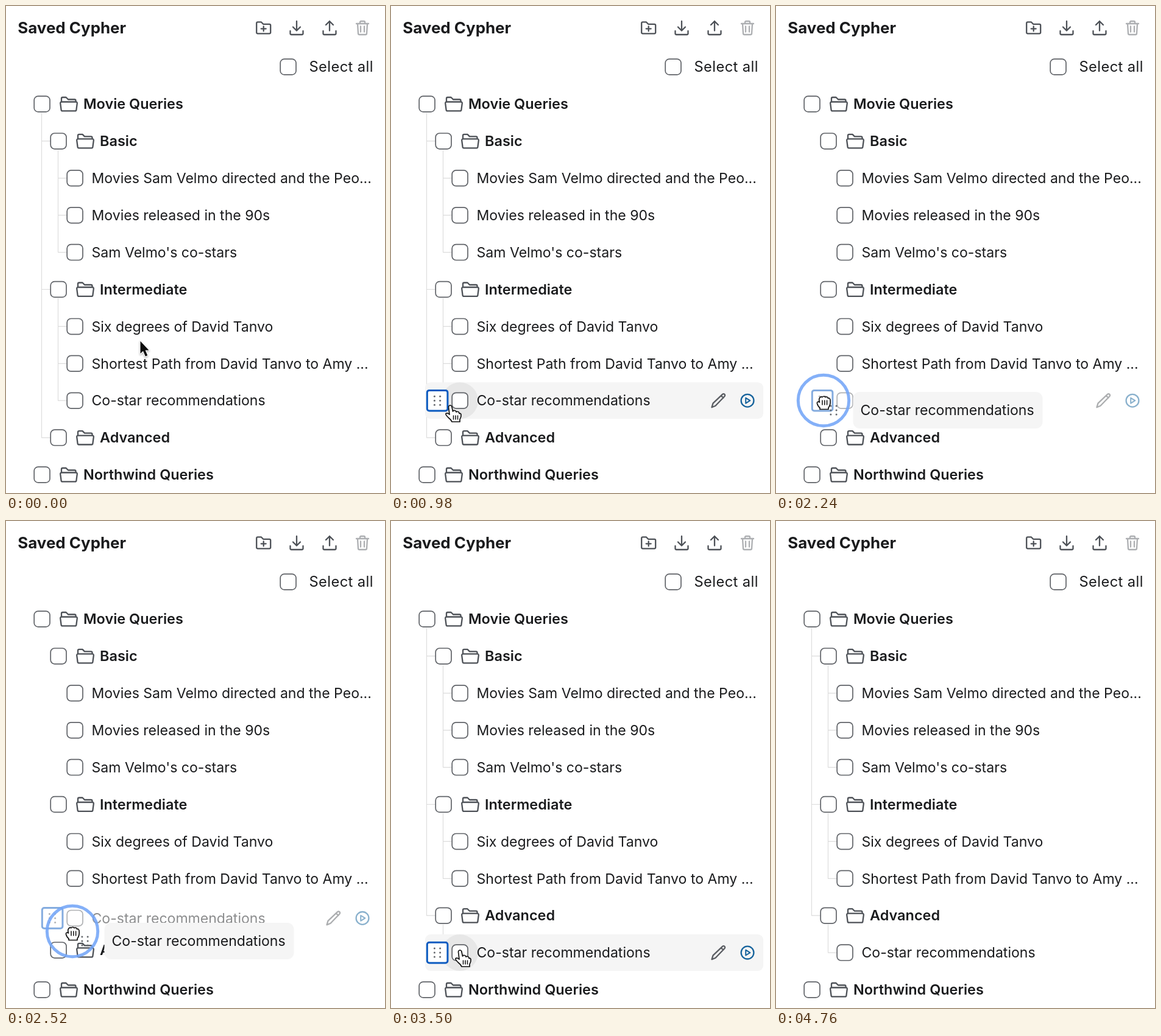
An HTML page with a canvas for the animation above (4.83 s loop, 622 by 800 pixels).

```html
<!DOCTYPE html>
<html lang="en">
<head>
<meta charset="utf-8">
<title>Saved Cypher</title>
<style>
  html, body { margin: 0; width: 100%; height: 100%; overflow: hidden; background: #fff; }
  canvas { display: block; width: 622px; height: 800px; }
</style>
</head>
<body>
<canvas id="stage" width="622" height="800"></canvas>
<script>
const ctx = document.getElementById('stage').getContext('2d');
const LOOP = 4830, STEP = 70, GAP = 60.9, TOP = 161;
const INK = '#1a1b1d', ICON = '#4d5157', LINE = '#dcdcdc', PALE = '#f5f5f5';
const DRAG_START = 2170, DROP = 3150;
const MOVED = 8, ADVANCED = 9;

const rows = [
  { level: 0, text: 'Movie Queries' },
  { level: 1, text: 'Basic' },
  { level: 2, text: 'Movies Sam Velmo directed and the Peo...', short: 'Movies Sam Velmo directed an...' },
  { level: 2, text: 'Movies released in the 90s' },
  { level: 2, text: "Sam Velmo's co-stars" },
  { level: 1, text: 'Intermediate' },
  { level: 2, text: 'Six degrees of David Tanvo' },
  { level: 2, text: 'Shortest Path from David Tanvo to Amy ...', short: 'Shortest Path from David Tanv...' },
  { level: 2, text: 'Co-star recommendations' },
  { level: 1, text: 'Advanced' },
  { level: 0, text: 'Northwind Queries' }
];

// Tracks hold [time, x, y]
const pointerTrack = [
  [420, 220, 550], [980, 97, 657], [1470, 77, 648], [2100, 77, 648],
  [2240, 78, 648], [2520, 109, 674], [3010, 112, 697], [3360, 113, 706],
  [3500, 113, 706], [3780, 155, 721], [3850, 155, 721], [4200, -30, 716]
];
const ghostTrack = [
  [2170, 138, 660], [2240, 139, 664], [2520, 174, 690], [3010, 178, 716], [3150, 179, 720]
];

const clamp = v => Math.max(0, Math.min(1, v));
const ease = v => { v = clamp(v); return v * v * (3 - 2 * v); };
const rowY = i => TOP + GAP * i;

function follow(track, t) {
  let i = 0;
  while (i < track.length - 2 && t >= track[i + 1][0]) i++;
  const [t0, x0, y0] = track[i], [t1, x1, y1] = track[i + 1];
  const k = ease((t - t0) / (t1 - t0));
  return { x: x0 + (x1 - x0) * k, y: y0 + (y1 - y0) * k };
}

function text(str, x, y, size = 23.05, weight = 400, spacing = 0) {
  ctx.font = `${weight} ${size}px Inter, "Open Sans", sans-serif`;
  ctx.letterSpacing = spacing + 'px';
  ctx.fillStyle = INK;
  ctx.fillText(str, x, y);
}

function box(x, y, w, h, r, fill, stroke, width) {
  ctx.beginPath();
  ctx.roundRect(x, y, w, h, r);
  if (fill) { ctx.fillStyle = fill; ctx.fill(); }
  if (stroke) { ctx.strokeStyle = stroke; ctx.lineWidth = width; ctx.stroke(); }
}

function disc(x, y, r, fill) {
  ctx.beginPath();
  ctx.arc(x, y, r, 0, 7);
  ctx.fillStyle = fill;
  ctx.fill();
}

function circle(x, y, r, color, width) {
  ctx.beginPath();
  ctx.arc(x, y, r, 0, 7);
  ctx.strokeStyle = color;
  ctx.lineWidth = width;
  ctx.stroke();
}

function draw(d, x, y, { stroke, width = 2.3, fill } = {}) {
  const path = new Path2D(d);
  ctx.save();
  ctx.translate(x, y);
  ctx.lineJoin = ctx.lineCap = 'round';
  if (fill) { ctx.fillStyle = fill; ctx.fill(path); }
  if (stroke) { ctx.strokeStyle = stroke; ctx.lineWidth = width; ctx.stroke(path); }
  ctx.restore();
}

const checkbox = (x, y) => box(x - 12.8, y - 12.9, 25.8, 25.8, 6.5, '#fff', '#606368', 1.7);

function folder(x, y) {
  draw('M-12 -3.5 V-9 a2 2 0 0 1 2 -2 H-4.5 l3.5 3.5 H9.5 a2 2 0 0 1 2 2 V-3.5' +
    'M-11.8 -3.5 H11.8 a2 2 0 0 1 2 2.4 L12.4 9.6 a2 2 0 0 1 -2 1.8 H-10.4 a2 2 0 0 1 -2 -1.8 L-13.8 -1.1 a2 2 0 0 1 2 -2.4 Z',
    x, y, { stroke: ICON });
}

function dots(x, y) {
  for (const dx of [-4.6, 4.6])
    for (const dy of [-7, 0, 7]) disc(x + dx, y + dy, 1.5, '#66696e');
}

function handle(y) {
  box(59.3, y - 16.8, 33.6, 33.6, 3.5, '#fff', '#0b5bc0', 3);
  dots(76, y);
}

function rowActions(y) {
  draw('M-11 11 L-9 4.5 L6.5 -10.3 a2.4 2.4 0 0 1 3.4 0 a2.4 2.4 0 0 1 0 3.4 L-5 8.6 Z M4 -8 L8 -4.5',
    537.5, y, { stroke: '#5a5d62' });
  circle(585, y, 10.4, '#16639c', 2.3);
  draw('M-2.8 -4.4 L4.3 0 L-2.8 4.4 Z', 585, y, { stroke: '#16639c', width: 2 });
}

function header() {
  text('Saved Cypher', 19.3, 44.6, 25.9, 700);
  const style = { stroke: ICON };
  draw('M-9.5 -9.5 H-4 l3.5 3.5 H9.5 a2 2 0 0 1 2 2 V7.5 a2 2 0 0 1 -2 2 H-9.5 a2 2 0 0 1 -2 -2 V-7.5 a2 2 0 0 1 2 -2 Z' +
    'M0 -2.5 V5.5 M-4 1.5 H4', 422.7, 35.8, style);
  const tray = 'M-10.5 5 V9 a2 2 0 0 0 2 2 H8.5 a2 2 0 0 0 2 -2 V5';
  draw(tray + 'M0 -11 V4.5 M-6 -1.5 L0 4.5 L6 -1.5', 477, 36, style);
  draw(tray + 'M0 4.5 V-11 M-6 -5 L0 -11 L6 -5', 531, 36, style);
  draw('M-10 -7 H10 M-4 -7 V-9.5 a1.5 1.5 0 0 1 1.5 -1.5 H2.5 a1.5 1.5 0 0 1 1.5 1.5 V-7' +
    'M-8 -7 L-7 9 a2 2 0 0 0 2 2 H5 a2 2 0 0 0 2 -2 L8 -7 M-3 -2.5 V6.5 M3 -2.5 V6.5',
    585, 36, { stroke: '#adafb2' });
  checkbox(463, 100);
  text('Select all', 497.5, 108.2, 23.7, 400, 0.4);
}

// One vertical guide with a branch to each child row
function guide(x, from, children) {
  const last = rowY(children[children.length - 1]);
  let d = `M${x} ${from} V${last}`;
  for (const i of children) d += `M${x} ${rowY(i)} h14`;
  draw(d, 0, 0, { stroke: LINE, width: 1.2 });
}

function guides(dropped) {
  const adv = dropped ? MOVED : ADVANCED;
  guide(58.5, rowY(0) + 15, [1, 5, adv]);
  guide(85.5, rowY(1) + 15, [2, 3, 4]);
  guide(85.5, rowY(5) + 15, dropped ? [6, 7] : [6, 7, 8]);
  if (dropped) guide(85.5, rowY(adv) + 15, [9]);
}

function drawRow(row, y, { hover, faded, pointer }) {
  const x = 59 + 27 * row.level;
  ctx.save();
  if (hover) {
    box(56, y - 30, 555, 60, 9, PALE);
    if (pointer.x > 83 && pointer.x < 143) disc(113, y, 30, '#e7e7e7');
  }
  if (faded) ctx.globalAlpha = 0.5;
  if (hover || faded) {
    handle(y);
    rowActions(y);
  }
  checkbox(x, y);
  if (row.level < 2) {
    folder(x + 44, y);
    text(row.text, x + 68, y + 8.2, 23.45, 600);
  } else {
    const label = hover && row.short || row.text;
    text(label, 140.5, y + 8.2);
    if (hover && pointer.x > 143)
      ctx.fillRect(141, y + 10.3, ctx.measureText(label).width, 1.6);
  }
  ctx.restore();
}

function ghost(t) {
  const { x, y } = follow(ghostTrack, t);
  box(x - 12.5, y - 30, 311, 60, 11, PALE);
  dots(x - 44.5, y);
  text(rows[MOVED].text, x - 0.5, y + 8.2);
}

function ring(t, p) {
  const k = ease((t - 1820) / 210) * (1 - ease((t - 3050) / 170));
  if (k <= 0) return;
  ctx.save();
  ctx.globalAlpha = k;
  circle(p.x, p.y, 22 + 19.7 * k, 'rgba(116,166,247,.88)', 5);
  ctx.restore();
}

const HAND = { fill: '#fff', stroke: '#111', width: 1.7 };

function palm(x, y, lift) {
  const up = v => v - lift;
  draw(`M-8 1 Q-11 1 -10.5 4 Q-9 9 -6 11 V13.5 H8 V11 Q12 6 11 ${up(-2)} Q10 ${up(-6)} 7.5 ${up(-4.5)}` +
    `Q6.5 ${up(-8)} 3 ${up(-6.5)} Q0 ${up(-9)} -2 ${up(-6.5)} Q-5 ${up(-8)} -6.5 ${up(-5)} Q-8 ${up(-3)} -6.5 2 Z`,
    x, y, HAND);
  draw(`M-2 ${up(-1)} V6 M1.8 ${up(-1)} V6 M5.6 ${up(-1)} V6`, x, y, { stroke: '#111', width: 1.5 });
}

function finger(x, y) {
  draw('M-2.5 2 C-2.5 -2 2.5 -2 3 2 L4.5 9 Q5 7 7.5 7.5 Q10 8 10 10 Q12 8.5 14 10 Q15 11 15 12.5' +
    'Q17 11.5 18 14 Q18.5 18 16 22 V26 H3 Q1 22 -3 19 Q-8 14 -7 12.5 Q-4 10.5 -1 14 Z', x, y, HAND);
  draw('M5.5 16 V22 M9 16 V22 M12.5 16 V22', x, y, { stroke: '#111', width: 1.5 });
}

function arrow(x, y) {
  const d = 'M0.5 0.5 V21 L5 16.8 L8.8 25.5 L12.3 24 L8.6 15.4 H14.5 Z';
  ctx.save();
  ctx.shadowColor = 'rgba(0,0,0,.3)';
  ctx.shadowBlur = 3;
  ctx.shadowOffsetY = 1.5;
  draw(d, x, y, { stroke: '#fff', width: 2.4 });
  ctx.restore();
  draw(d, x, y, { fill: '#0b0b0b' });
}

function cursor(t, p, overItem) {
  if (t >= 1960 && t < DROP) palm(p.x, p.y + 1, 0);
  else if (!overItem) arrow(p.x, p.y);
  else if (p.x < 95) palm(p.x, p.y + 1, 4);
  else finger(p.x, p.y);
}

function render(t) {
  const pointer = follow(pointerTrack, t);
  const dragging = t >= DRAG_START && t < DROP;
  const shift = GAP * ease((t - 2480) / 250);
  const place = i => rowY(i) + (i === MOVED ? shift : i === ADVANCED ? -shift : 0);
  const active = !dragging && t > 420 && pointer.x >= 56;
  const isHovered = i => active && rows[i].level === 2 && Math.abs(pointer.y - place(i)) < GAP / 2;

  ctx.fillStyle = '#fff';
  ctx.fillRect(0, 0, 622, 800);
  header();
  if (!dragging) guides(t >= DROP);

  let overItem = false;
  rows.forEach((row, i) => {
    const hover = isHovered(i);
    overItem = overItem || hover;
    drawRow(row, place(i), { hover, faded: dragging && i === MOVED, pointer });
  });

  if (dragging) ghost(t);
  ring(t, pointer);
  if (t < 4200) cursor(t, pointer, overItem);
}

const start = performance.now();
function tick() {
  const t = (performance.now() - start) % LOOP;
  render(Math.floor(t / STEP) * STEP);
  requestAnimationFrame(tick);
}
tick();
</script>
</body>
</html>
```
